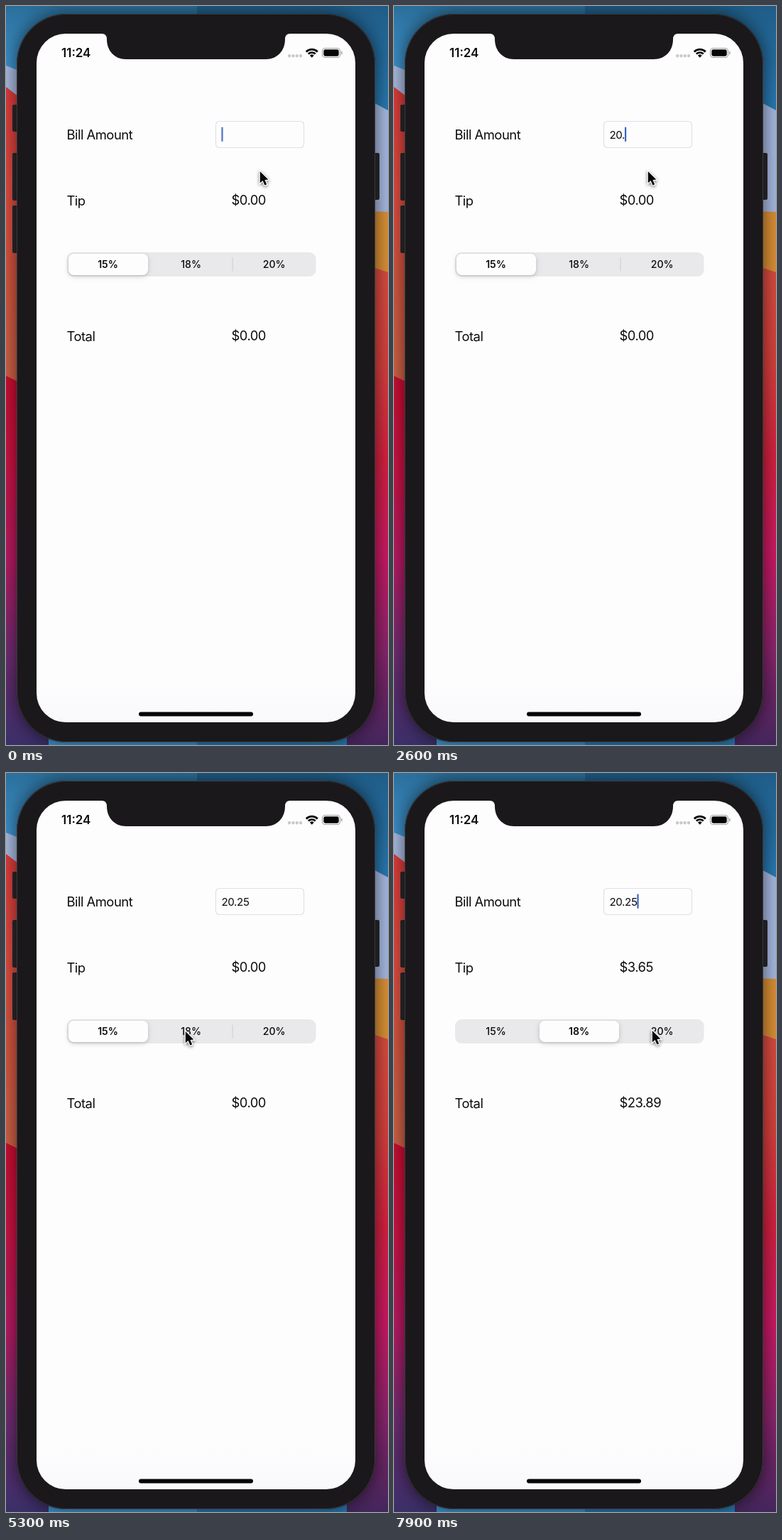
An HTML page with a canvas for the animation above (8 s loop, 538x1041 px).

```html
<!DOCTYPE html>
<html lang="en">
<head>
<meta charset="utf-8">
<title>Tip calculator</title>
<style>
  html, body { margin: 0; width: 100%; height: 100%; overflow: hidden; background: #1a181a; }
  canvas { display: block; width: 538px; height: 1041px; }
</style>
</head>
<body>
<canvas id="stage"></canvas>
<script>
const W = 538, H = 1041, LOOP = 8000, STEP = 100;
const FONT = 'Inter, Roboto, sans-serif';
const canvas = document.getElementById('stage');
const dpr = window.devicePixelRatio || 1;
canvas.width = Math.round(W * dpr);
canvas.height = Math.round(H * dpr);
const ctx = canvas.getContext('2d');
ctx.scale(dpr, dpr);

const clamp = v => Math.max(0, Math.min(1, v));
const lerp = (a, b, u) => a + (b - a) * u;

const TYPED = [[1900, '2'], [2200, '20'], [2500, '20.'], [3100, '20.2'], [3500, '20.25']];
const TYPING_END = 3900;
const TAP = 6700, SLIDE = 400;
// time, x, y of the pointer tip
const POINTER = [
  [4500, 357, 231], [5200, 252, 362], [5600, 252, 362], [6400, 204, 358],
  [7200, 204, 358], [7800, 363, 361], [8000, 363, 361]
];

function box(x, y, w, h, r, fill) {
  ctx.beginPath();
  ctx.roundRect(x, y, w, h, r);
  if (fill) {
    ctx.fillStyle = fill;
    ctx.fill();
  }
}

function poly(points, fill) {
  ctx.beginPath();
  points.forEach(([x, y]) => ctx.lineTo(x, y));
  ctx.closePath();
  ctx.fillStyle = fill;
  ctx.fill();
}

function label(str, x, y, size, { weight = 400, align = 'left', spacing = 0 } = {}) {
  ctx.font = `${weight} ${size}px ${FONT}`;
  ctx.letterSpacing = spacing + 'px';
  ctx.textAlign = align;
  ctx.fillStyle = '#0c0b0d';
  ctx.fillText(str, x, y);
  return ctx.measureText(str).width;
}

function vertical(y0, y1, ...colors) {
  const g = ctx.createLinearGradient(0, y0, 0, y1);
  colors.forEach((c, i) => g.addColorStop(i / (colors.length - 1), c));
  return g;
}

// A wallpaper layer whose upper edge slants from y0 to y1, reaching the bottom
function layer(x0, x1, y0, y1, fill) {
  poly([[x0, y0], [x1, y1], [x1, H], [x0, H]], fill);
}

function wallpaper() {
  const mid = W / 2;
  ctx.fillStyle = vertical(0, 90, '#2b6f9b', '#3d93cd');
  ctx.fillRect(0, 0, mid, H);
  ctx.fillStyle = vertical(0, 140, '#1f5d88', '#2878b0');
  ctx.fillRect(mid, 0, mid, H);

  layer(0, 60, 84, 108, '#a9bbe0');
  layer(0, 60, 114, 160, vertical(114, 521, '#dc3b3b', '#dc4a40', '#d3563f', '#cf6146'));
  layer(0, 60, 521, 550, vertical(521, H, '#cb0d31', '#cc1245', '#b71a64', '#702c72', '#3a2f68'));

  layer(480, W, 116, 147, '#a5b8e0');
  layer(480, W, 288, 290, '#d98f35');
  layer(480, W, 356, 375, vertical(370, H, '#d84b40', '#d4403c', '#d32040', '#c91863', '#8a246c', '#43265c'));
}

function phone() {
  for (const [y, h] of [[139, 38], [207, 67], [281, 67]]) box(9, y, 9, h, 2, '#29282b');
  box(517, 207, 9, 66, 2, '#29282b');

  ctx.save();
  ctx.shadowColor = 'rgba(0,0,0,.6)';
  ctx.shadowBlur = 26 * dpr;
  box(15, 11, 505, 1026, 70, '#1a181a');
  ctx.restore();
  box(15.5, 11.5, 504, 1025, 70);
  ctx.strokeStyle = '#3a393c';
  ctx.lineWidth = 1;
  ctx.stroke();

  box(43, 39, 449, 970, 41, vertical(940, 1009, '#fefdfe', '#f9f8fa'));
  notch();
  box(187, 994.5, 161, 6, 3, '#050505');
}

function notch() {
  const l = 142, r = 393, top = 39, bottom = 75;
  ctx.beginPath();
  ctx.moveTo(l - 7, top - 1);
  ctx.lineTo(l - 7, top);
  ctx.quadraticCurveTo(l, top, l, top + 8);
  ctx.bezierCurveTo(l, bottom - 12, l + 11, bottom, l + 27, bottom);
  ctx.lineTo(r - 27, bottom);
  ctx.bezierCurveTo(r - 11, bottom, r, bottom - 12, r, top + 8);
  ctx.quadraticCurveTo(r, top, r + 7, top);
  ctx.lineTo(r + 7, top - 1);
  ctx.fillStyle = '#1a181a';
  ctx.fill();
}

function statusBar() {
  label('11:24', 78, 72, 17, { weight: 600 });
  for (let i = 0; i < 4; i++) box(397 + i * 5.3, 68, 4.2, 4.4, 1.8, '#c9c8cc');

  const a0 = -Math.PI * 0.75, a1 = -Math.PI * 0.25;
  ctx.strokeStyle = '#050505';
  ctx.lineWidth = 2.7;
  for (const r of [7, 11.3]) {
    ctx.beginPath();
    ctx.arc(430.8, 72.5, r, a0, a1);
    ctx.stroke();
  }
  ctx.beginPath();
  ctx.moveTo(430.8, 72.8);
  ctx.arc(430.8, 72.5, 4, a0, a1);
  ctx.fillStyle = '#050505';
  ctx.fill();

  box(445.5, 59.5, 25, 13, 4);
  ctx.strokeStyle = '#9f9ea2';
  ctx.lineWidth = 1.1;
  ctx.stroke();
  box(447.3, 61.3, 21.4, 9.4, 2.4, '#050505');
  box(472, 63.8, 1.5, 4.4, 0.8, '#9f9ea2');
}

function caretAlpha(t) {
  if (t >= TYPED[0][0] && t < TYPING_END) return 1;
  const p = (t % 1000) / 1000;
  return p < 0.3 ? clamp(0.9 - 4.5 * p) : clamp((p - 0.3) / 0.3);
}

function billField(t) {
  box(295.5, 162.5, 124, 37, 5, '#fefdfe');
  ctx.strokeStyle = '#e0dfe6';
  ctx.lineWidth = 1.2;
  ctx.stroke();
  const entry = TYPED.filter(([at]) => t >= at).pop();
  const width = entry ? label(entry[1], 303.5, 186.5, 15.15, { spacing: -0.4 }) : 0;
  ctx.globalAlpha = caretAlpha(t);
  box(303.4 + width, 170.5, 2.2, 20.5, 1, '#3a63bd');
  ctx.globalAlpha = 1;
}

function segments(t) {
  const u = clamp((t - TAP) / SLIDE);
  const slide = 1 - (1 - u) ** 2;
  const selected = t >= TAP ? 1 : 0;
  box(86, 347, 350.5, 34, 9, '#e9e8ea');

  ctx.globalAlpha = 1 - u;
  box(318.5, 354.5, 1.1, 19, 0.5, '#cfced3');
  ctx.globalAlpha = 1;

  ctx.save();
  ctx.shadowColor = 'rgba(0,0,0,.2)';
  ctx.shadowBlur = 6 * dpr;
  ctx.shadowOffsetY = 2 * dpr;
  box(lerp(88, 205, slide), 349, 112, 30, 7.5, '#fefdfe');
  ctx.restore();

  ['15%', '18%', '20%'].forEach((str, i) =>
    label(str, 143.5 + i * 117.1, 369, 14.1, { weight: i === selected ? 600 : 500, align: 'center' }));
}

function pointer(t) {
  let i = 0;
  while (i < POINTER.length - 2 && t >= POINTER[i + 1][0]) i++;
  const [t0, x0, y0] = POINTER[i], [t1, x1, y1] = POINTER[i + 1];
  let u = clamp((t - t0) / (t1 - t0));
  u = u * u * (3 - 2 * u);

  ctx.save();
  ctx.translate(lerp(x0, x1, u), lerp(y0, y1, u));
  const arrow = [[0.8, 2], [0.8, 18.3], [4.6, 14.9], [7.4, 21.4], [10.2, 20.2], [7.4, 13.9], [12.4, 13.6]];
  ctx.shadowColor = 'rgba(0,0,0,.4)';
  ctx.shadowBlur = 4 * dpr;
  ctx.shadowOffsetY = 1.5 * dpr;
  poly(arrow, '#fff');
  ctx.strokeStyle = '#fff';
  ctx.lineWidth = 2.6;
  ctx.stroke();
  ctx.shadowColor = 'transparent';
  poly(arrow, '#050505');
  ctx.restore();
}

function draw(t) {
  wallpaper();
  phone();
  statusBar();

  const row = { spacing: -0.5 };
  const done = t >= TAP;
  label('Bill Amount', 85.5, 188, 18.4, row);
  label('Tip', 85.5, 281, 18.4, row);
  label('Total', 85.5, 471.5, 18.4, row);
  label(done ? '$3.65' : '$0.00', 317.5, 280, 18.4, row);
  label(done ? '$23.89' : '$0.00', 317.5, 470.5, 18.4, row);

  billField(t);
  segments(t);
  pointer(t);
}

const start = performance.now();
function tick() {
  const t = (performance.now() - start) % LOOP;
  draw(Math.floor(t / STEP) * STEP);
  requestAnimationFrame(tick);
}
tick();
</script>
</body>
</html>
```
